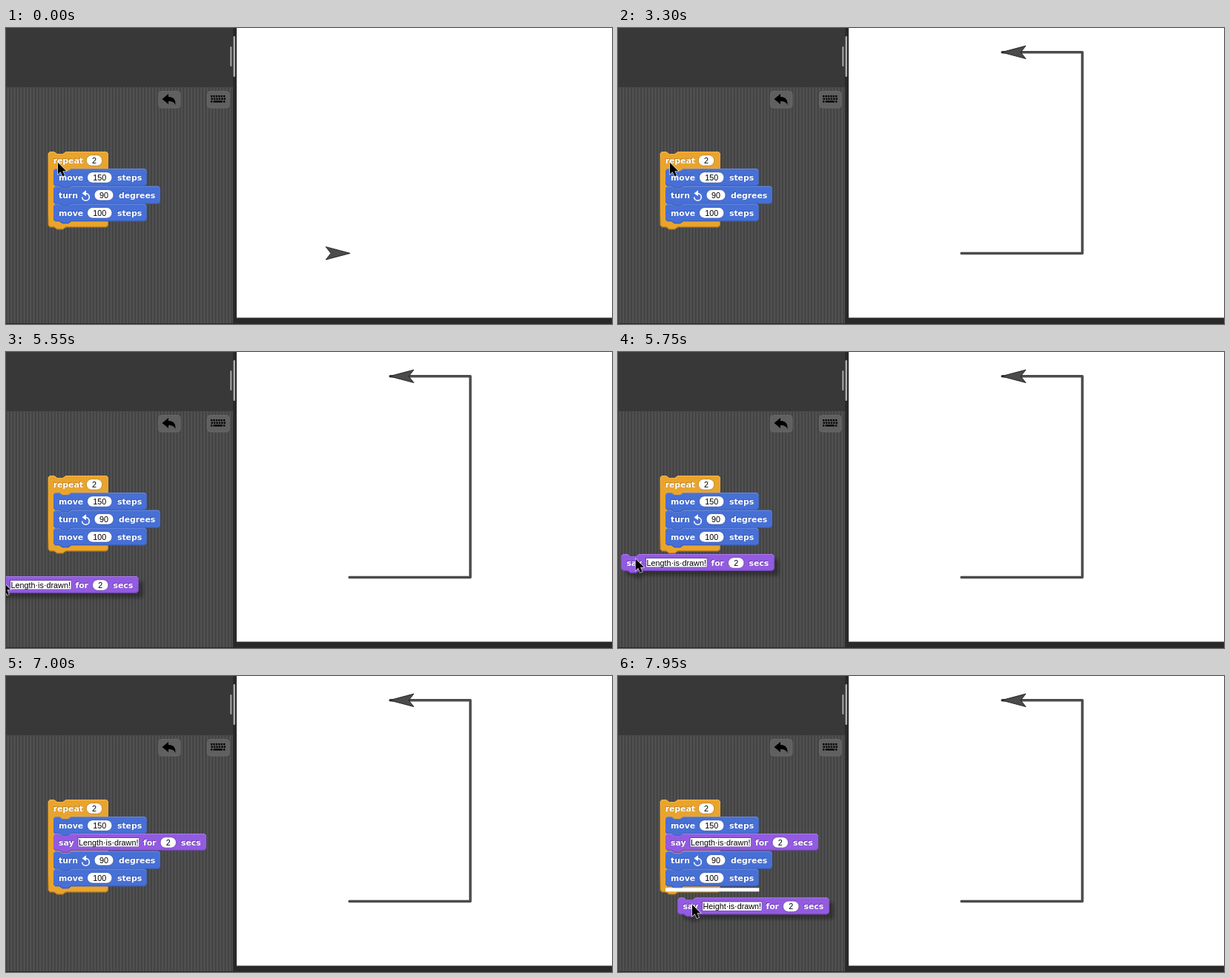
An HTML page with a canvas for the animation above (8 s loop, 817 by 400 pixels).

```html
<!DOCTYPE html>
<html lang="en">
<head>
<meta charset="utf-8">
<style>
html, body { margin: 0; width: 100%; height: 100%; overflow: hidden; background: #2a2828; }
canvas { display: block; }
</style>
</head>
<body>
<canvas id="stage" width="817" height="400"></canvas>
<script>
const ctx = document.getElementById('stage').getContext('2d');
const LOOP = 8000, RUN = 2700, DONE = 2850, DROP = 6300;
const LABEL = 'bold 10.8px "DejaVu Sans", sans-serif';
const VALUE = '10.8px "Liberation Sans", Arial, sans-serif';
const ORANGE = { fill: '#eaa42c', light: '#f2b84f', dark: '#b67c20' };
const BLUE = { fill: '#4770d6', light: '#6a8de4', dark: '#3556ab' };
const PURPLE = { fill: '#925be0', light: '#ab80ea', dark: '#6b41ac' };

// Key points: [time, x, y]
const POINTER = [[4400, 70, 182], [4750, 50, 228], [5150, -14, 357], [5350, -190, 350],
  [5550, -5, 310], [6150, 81, 219], [6300, 82, 219], [6800, -14, 282], [7450, -190, 386], [7950, 100, 309]];
const FIRST_DRAG = [[5350, -215, 337], [5550, -27.5, 303], [6150, 68.5, 213], [6300, 70, 213]];
const SECOND_DRAG = [[7450, -210, 378], [7700, 0, 345], [7950, 80.5, 299.4]];

function along(keys, t) {
  const i = keys.findIndex(k => k[0] > t);
  if (i === 0) return keys[0].slice(1);
  if (i < 0) return keys.at(-1).slice(1);
  const a = keys[i - 1], b = keys[i];
  const p = (t - a[0]) / (b[0] - a[0]);
  return [a[1] + (b[1] - a[1]) * p, a[2] + (b[2] - a[2]) * p];
}

function rect(x, y, w, h, fill) {
  ctx.fillStyle = fill;
  ctx.fillRect(x, y, w, h);
}

function roundRect(x, y, w, h, r, fill, stroke) {
  ctx.beginPath();
  ctx.roundRect(x, y, w, h, r);
  ctx.fillStyle = fill;
  ctx.fill();
  if (stroke) {
    ctx.lineWidth = 0.8;
    ctx.strokeStyle = stroke;
    ctx.stroke();
  }
}

function polygon(points) {
  ctx.beginPath();
  points.forEach(p => ctx.lineTo(...p));
  ctx.closePath();
}

// Block outline with a notch on top and a tab below
function outline(x, y, w, h) {
  const r = 2.5, b = y + h, e = x + w;
  polygon([[x, y + r], [x + r, y], [x + 8, y], [x + 12, y + 3], [x + 20, y + 3], [x + 24, y],
    [e - r, y], [e, y + r], [e, b - r], [e - r, b], [x + 24, b], [x + 20, b + 3],
    [x + 12, b + 3], [x + 8, b], [x + r, b], [x, b - r]]);
}

function body(x, y, w, h, color) {
  outline(x, y, w, h);
  ctx.fillStyle = color.fill;
  ctx.fill();
  ctx.save();
  ctx.shadowColor = 'transparent';
  ctx.clip();
  const edge = ctx.createLinearGradient(0, y, 0, y + h);
  edge.addColorStop(0, color.light);
  edge.addColorStop(0.2, color.fill);
  edge.addColorStop(0.8, color.fill);
  edge.addColorStop(1, color.dark);
  ctx.strokeStyle = edge;
  ctx.lineWidth = 2;
  ctx.stroke();
  ctx.restore();
}

function label(text, x, y, color) {
  ctx.font = LABEL;
  ctx.fillStyle = color.dark;
  ctx.fillText(text, x - 0.8, y + 15);
  ctx.fillStyle = '#fff';
  ctx.fillText(text, x, y + 15.8);
}

function value(text, x, y) {
  ctx.font = VALUE;
  ctx.fillStyle = '#000';
  ctx.fillText(text, x, y + 15.9);
}

function oval(text, x, y, w, color) {
  roundRect(x, y + 4.7, w, 14.6, 7.3, '#fff', color.dark);
  ctx.textAlign = 'center';
  value(text, x + w / 2, y);
  ctx.textAlign = 'left';
}

function move(x, y, steps) {
  body(x, y, 125.5, 23.5, BLUE);
  label('move', x + 7, y, BLUE);
  oval(steps, x + 45.5, y, 33.5, BLUE);
  label('steps', x + 86, y, BLUE);
}

function turn(x, y) {
  body(x, y, 144, 24, BLUE);
  label('turn', x + 7, y, BLUE);
  ctx.strokeStyle = ctx.fillStyle = '#fff';
  ctx.lineWidth = 1.6;
  ctx.beginPath();
  ctx.arc(x + 43.5, y + 14.6, 4.8, Math.PI, -Math.PI / 2, true);
  ctx.stroke();
  polygon([[x + 38.5, y + 9.6], [x + 44, y + 5.4], [x + 44, y + 13.4]]);
  ctx.fill();
  oval('90', x + 55, y, 26, BLUE);
  label('degrees', x + 88, y, BLUE);
}

function say(x, y, text, field) {
  body(x, y, field + 123, 22.8, PURPLE);
  ctx.shadowColor = 'transparent';
  label('say', x + 7, y, PURPLE);
  rect(x + 32.6, y + 5, field, 13, PURPLE.dark);
  rect(x + 33.6, y + 6, field - 1.5, 11.5, '#fff');
  value(text, x + 34, y - 0.2);
  const end = x + 33 + field;
  label('for', end + 5, y, PURPLE);
  oval('2', end + 28, y, 21.5, PURPLE);
  label('secs', end + 56, y, PURPLE);
}

const sayLength = (x, y) => say(x, y, 'Length·is·drawn!', 83);
const sayHeight = (x, y) => say(x, y, 'Height·is·drawn!', 81);

function script(extended) {
  const shift = extended ? 23 : 0;
  body(56.8, 167, 81, 102.3 + shift, ORANGE);
  label('repeat', 63.7, 167, ORANGE);
  oval('2', 108.3, 167, 21.5, ORANGE);
  move(64, 190, '150');
  if (extended) sayLength(64, 213);
  turn(64, 213.8 + shift);
  move(64, 237.8 + shift, '100');
}

function glow() {
  ctx.save();
  ctx.shadowColor = 'rgb(153,255,213)';
  ctx.shadowBlur = 10;
  ctx.lineWidth = 6;
  ctx.strokeStyle = 'rgb(153,255,213)';
  [[57, 167, 81, 102], [64, 190, 126, 71], [64, 214, 144, 24]].forEach(box => {
    outline(...box);
    ctx.stroke();
  });
  ctx.restore();
}

function drag(drawBlock, [x, y]) {
  ctx.save();
  ctx.shadowColor = 'rgba(0,0,0,.32)';
  ctx.shadowBlur = 4;
  ctx.shadowOffsetX = ctx.shadowOffsetY = 6.5;
  drawBlock(x, y);
  ctx.restore();
}

function pointer([x, y]) {
  polygon([[0, 0], [0, 15.5], [3.6, 12.2], [6.3, 18.3], [9, 17.2], [6.4, 11.3], [11.2, 11.2]]
    .map(p => [x + p[0], y + p[1]]));
  ctx.lineWidth = 1.4;
  ctx.strokeStyle = '#ddd';
  ctx.stroke();
  ctx.fillStyle = '#000';
  ctx.fill();
}

function turtle(x, y, angle) {
  ctx.save();
  ctx.translate(x, y);
  ctx.rotate(angle);
  polygon([[1, 0], [-31.8, -8.7], [-25, 0], [-31.8, 8.7]]);
  ctx.fillStyle = '#4b4b4b';
  ctx.fill();
  ctx.strokeStyle = '#1c1c1c';
  ctx.lineWidth = 0.9;
  ctx.stroke();
  ctx.restore();
}

function drawing(t) {
  const trail = [[463, 304.4], [626, 304.4], [626, 196], [626, 32.8], [518, 32.8]];
  const done = t < RUN ? 1 : t < DONE ? 3 : 5;
  ctx.beginPath();
  trail.slice(0, done).forEach(p => ctx.lineTo(...p));
  ctx.lineWidth = 3.5;
  ctx.lineCap = ctx.lineJoin = 'round';
  ctx.strokeStyle = '#4b4b4b';
  if (done > 1) ctx.stroke();
  ctx.lineCap = 'butt';
  ctx.lineJoin = 'miter';
  turtle(...trail[done - 1], -(done - 1) / 2 * Math.PI / 2);
}

function button(x) {
  roundRect(x + 0.5, 85.5, 29.5, 22.5, 4, '#606060', '#6c6c6c');
}

function workspace() {
  rect(0, 0, 817, 400, '#2a2828');
  rect(0, 0, 306, 80, '#383838');
  rect(0, 80, 306, 319, '#505050');
  for (let x = 0; x < 306; x += 4.336) rect(x, 80, 1.5, 319, '#404040');
  rect(311, 0, 506, 391.5, '#fff');
  roundRect(302.3, 25, 2, 27, 1, '#aaa');
  roundRect(306.6, 11, 2.2, 55, 1, '#bbb');

  button(205);
  ctx.fillStyle = '#000';
  ctx.beginPath();
  ctx.moveTo(210.5, 96);
  ctx.lineTo(219, 89);
  ctx.lineTo(219, 93);
  ctx.quadraticCurveTo(229, 93, 228.5, 104);
  ctx.quadraticCurveTo(226, 98.5, 219, 99);
  ctx.lineTo(219, 103);
  ctx.fill();

  button(271);
  for (let row = 0; row < 3; row++)
    for (let key = 0; key < 6; key++)
      if (row < 2 || key === 0 || key === 5)
        rect(276 + key * 3.4 + (row === 1 ? 0.6 : 0), 91 + row * 3.6, 2.3, 2.4, '#000');
  rect(279.6, 98.2, 12.4, 2.4, '#000');
}

function draw(t) {
  workspace();
  drawing(t);
  if (t >= RUN && t < DONE) glow();
  script(t >= DROP);
  if (t >= 6000 && t < DROP) rect(64, 213, 126, 4.5, '#fff');
  if (t >= 7850) rect(64, 286.3, 126.3, 5, '#fff');
  if (t > 5350 && t < DROP) drag(sayLength, along(FIRST_DRAG, t));
  if (t > 7450) drag(sayHeight, along(SECOND_DRAG, t));
  pointer(along(POINTER, t));
}

const start = performance.now();
function frame() {
  const t = (performance.now() - start) % LOOP;
  draw(Math.floor(t / 50) * 50);
  requestAnimationFrame(frame);
}
frame();
</script>
</body>
</html>
```
